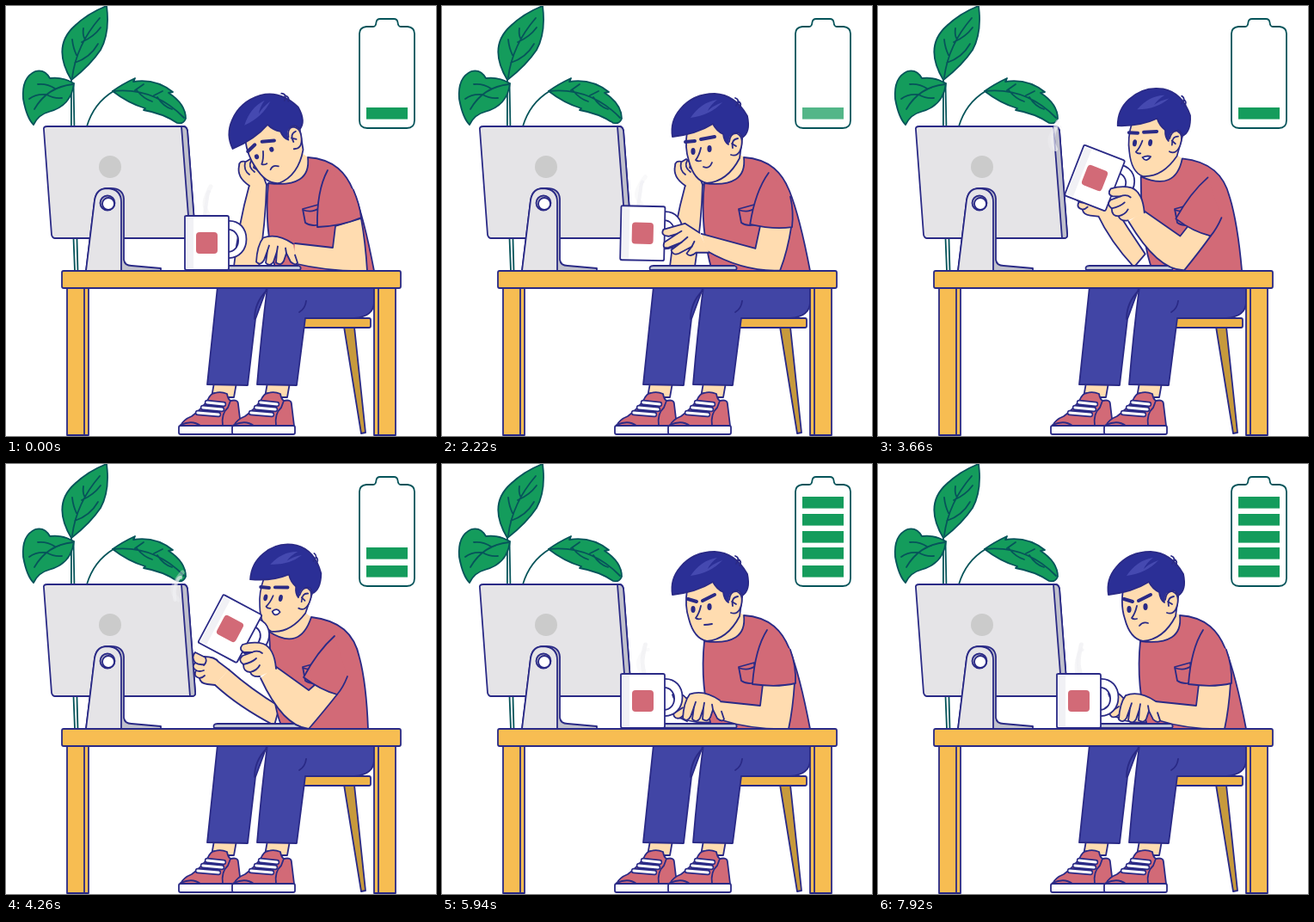
An HTML page that plays this animation: 500x500 px, repeating every 8 s.

```html
<!DOCTYPE html>
<html lang="en">
<head>
<meta charset="utf-8">
<title>Desk worker</title>
<style>
html, body { margin: 0; width: 100%; height: 100%; overflow: hidden; background: #fff; }
svg { display: block; width: 100vw; height: 100vh; }
.o { stroke: #2a2a86; stroke-width: 1.8; stroke-linejoin: round; stroke-linecap: round; fill: none; }
.skin { fill: #ffdcb0; }
.shirt { fill: #d26a77; }
.pants { fill: #4145a5; }
.wood { fill: #f7bd52; }
.white { fill: #fff; }
.screen { fill: #e5e4e7; }
.edge { fill: #c0c0cc; }
.plant { fill: #149c5c; stroke: #06545a; stroke-width: 1.8; stroke-linejoin: round; stroke-linecap: round; }
.vein { fill: none; stroke: #06545a; stroke-width: 1.8; stroke-linecap: round; }
</style>
</head>
<body>
<svg viewBox="0 0 500 500">
  <defs>
    <g id="shoe">
      <path class="o skin" d="M242 438L239 455H265L268 438Z"/>
      <path class="o shirt" d="M203 488Q206 481 216 477Q227 469 234 459Q238 450 243 450Q250 448 257 451Q258 457 261 459Q270 457 270 463L273 488Z"/>
      <path class="o" d="M203 487Q217 481 226 488M252 488Q250 474 258 467L261 459"/>
      <path class="o" style="stroke-width:6.4" d="M234 461l19 2M229 467l22 2M223 473l24 2"/>
      <path class="o" style="stroke:#fff;stroke-width:3.2" d="M234 461l19 2M229 467l22 2M223 473l24 2"/>
      <rect class="o white" x="201" y="488" width="73" height="10" rx="2"/>
    </g>
  </defs>

  <g id="plants">
    <path class="vein" d="M76 84Q75 200 80 308M78.500 90Q80 200 83.500 308M94 140Q102 113 125 99"/>
    <path class="plant" d="M76 86C61 61 61 40 80 23Q96 8 117 0Q121 31 110 51Q98 69 76 86Z"/>
    <path class="vein" d="M77 83Q82 45 109 14M82 57Q78 49 77 39M80 66Q98 60 107 44M91 37Q89 33 90 26M88 42Q102 36 110 25"/>
    <path class="plant" d="M79 90Q66 82 51 84Q45 73 34 76Q18 83 20 108Q24 130 32 138Q38 126 50 123Q76 116 79 90Z"/>
    <path class="vein" d="M78 91Q48 94 33 120M57 96Q48 90 37 91M46 103Q35 102 27 108M47 103Q56 108 65 107"/>
    <path class="plant" d="M124 99Q135 91 150 84L148 88Q174 84 194 100L189 101Q209 114 209 131Q206 138 199 136Q183 125 160 121L162 119Q142 113 124 99Z"/>
    <path class="vein" d="M124 99Q172 94 207 130M150 98L160 91M172 104L182 99M152 98Q160 108 170 111M176 106Q183 117 193 120"/>
  </g>

  <path class="o screen" d="M48 140H206Q210 140 211 145L220 265Q221 270 216 270H57Q54 270 53 266L44 144Q43 140 48 140Z"/>
  <path class="o edge" d="M204 140H206Q210 140 211 145L220 265Q221 270 216 270H214Z"/>
  <circle cx="121" cy="187" r="13" fill="#cbcbcb"/>
  <path class="o edge" d="M93 308L103 226Q105 212 119 212Q136 211 137 224V295Q138 302 146 302L180 305V308Z"/>
  <path class="o screen" d="M93 308L103 226Q105 212 118 212Q134 213 134 228V308Z"/>
  <circle class="o edge" cx="118" cy="229" r="8.500"/>
  <circle class="o white" cx="119" cy="230" r="7"/>

  <path class="o" style="fill:#c79a3c" d="M393 373L405 373L418 496L413 497Z"/>
  <rect class="o" style="fill:#eeb349" x="335" y="363" width="89" height="11" rx="2"/>
  <use id="shoeL" href="#shoe"/>
  <path id="legL" class="o pants"/>
  <use href="#shoe" x="62"/>
  <path class="o pants" d="M304 326Q297 380 292 440L338 441L348 363Q380 363 405 363Q428 361 428 344V326Z"/>
  <path class="o" d="M289 364Q289 345 303 331M349 343Q348 352 341 356"/>

  <path id="far" class="o skin"/>
  <g id="farHands">
    <g data-hand="fist" data-at="293 207.500">
      <path class="o skin" d="M283 209Q268 199 271 186Q271 179 279 181L284 178Q290 181 288 188Q296 192 300 200L303 208"/>
      <path class="o" d="M278 182Q276 191 283 196M285 180Q281 187 289 193"/>
    </g>
    <g data-hand="pinch" data-at="293 207.500">
      <path class="o skin" d="M283 209Q267 200 268 186Q269 179 278 180L284 182L290 175Q296 177 293 191Q297 194 300 200L303 208"/>
      <path class="o" d="M274 182Q274 191 282 192Q289 189 284 183M290 177Q286 186 292 192"/>
    </g>
    <g data-hand="open" data-at="251 248">
      <path class="o skin" d="M243 257L234 256Q226 255 225 249Q217 247 221 240Q215 236 220 231Q215 224 220 219L230 224Q243 224 247 230L259 239"/>
      <path class="o" d="M220 231Q224 234 231 233M221 240Q225 242 230 240M225 249Q228 249 231 246M231 224Q235 229 230 234"/>
    </g>
    <g data-hand="rest" data-at="285 285">
      <path class="o skin" d="M285 272Q275 261 268 267Q270 274 275 276L264 284Q261 291 269 289Q270 296 277 294L285 298"/>
      <path class="o" d="M269 289L280 282M277 294L286 287"/>
    </g>
  </g>

  <path id="neck" class="skin"/>
  <path id="torso" class="o shirt"/>
  <path id="pocket" class="o" d="M345 236L363 231L366 254Q355 257 348 252ZM345 237Q356 241 364 235"/>

  <g id="head">
    <path class="o skin" d="M285 146Q282 165 287 180Q293 203 308 206Q332 204 346 177L350 148L318 132Z"/>
    <path d="M268 152Q265 134 277 120Q292 102 317 102Q341 103 355 128Q359 147 349 153Q345 143 337 150L333 161Q328 158 327 149Q319 145 315 137Q296 149 268 152Z" class="o" style="fill:#2b2f96"/>
    <path d="M289 130Q301 112 320 109Q312 115 309 122Q315 116 326 112Q312 127 289 130Z" fill="#4549b0"/>
    <path class="o" d="M341 107Q347 109 342 116M346 118Q349 114 345 111"/>
    <path class="skin" d="M334 162Q332 149 341 148Q351 150 349 162Q346 174 337 173Z"/>
    <path class="o" d="M334 158Q335 148 342 148Q351 151 348 164Q345 176 336 173M344 154Q336 155 338 165M337 160L342 163"/>
    <path class="o" d="M301 165Q299 174 295 179Q297 181 301 180"/>
    <path id="brows" class="o" style="stroke-width:4"/>
    <path id="mouth" class="o white"/>
    <g fill="#2a2a86">
      <ellipse class="eye" cx="292" cy="169" rx="2.600"/>
      <ellipse class="eye" cx="311" cy="166" rx="2.600"/>
    </g>
  </g>

  <path class="o" style="fill:#c3c7d6" d="M242 307Q240 302 246 302H340Q344 303 342 307Z"/>
  <g id="steam" fill="none" stroke="#f1f1f4" stroke-linecap="round"><path/><path/></g>
  <g id="mug">
    <path class="o white" fill-rule="evenodd" d="M257 250C287 247 287 295 257 293V286C274 287 275 259 257 260Z"/>
    <path class="o white" d="M208 245Q208 244 210 244H257Q259 244 259 246V305Q259 307 257 307H210Q208 307 208 305Z"/>
    <path d="M210 246h8v59h-8z" fill="#f1f1f5"/>
    <rect x="221" y="263" width="25" height="25" rx="4" fill="#d26a77"/>
  </g>
  <path id="near" class="o skin"/>
  <path id="sleeve" class="o shirt"/>
  <g id="nearHands">
    <g data-hand="type" data-at="324 287">
      <path class="o skin" d="M323 276Q304 263 288 269Q281 278 280 297Q285 302 289 295L293 284L291 298Q296 303 300 297L304 285L303 298Q309 302 312 296L315 287L320 297Q326 302 328 298L325 289"/>
      <path class="o" d="M293 284L295 278M304 285L305 279M315 287L314 281"/>
    </g>
    <g data-hand="reach" data-at="308 281">
      <path class="o skin" d="M303 270L286 259Q275 262 261 266Q257 273 267 274L277 271L262 281Q259 289 267 287L282 281L270 290Q272 297 279 294L294 286L288 294Q292 299 299 293L314 293"/>
      <path class="o" d="M277 271L282 268M282 281L289 275M294 286L297 280"/>
    </g>
    <g data-hand="grip" data-at="290.500 250">
      <path class="o skin" d="M300 246Q298 222 285 217Q274 214 261 218Q256 224 263 227L272 227L261 231Q255 236 262 241Q262 250 270 250Q272 256 281 255"/>
      <path class="o" d="M272 227Q279 224 284 228M262 241Q272 239 277 234M270 250Q278 248 281 242"/>
    </g>
  </g>

  <path class="o wood" d="M71 328H96V499H71ZM91 328V499M428 328H453V499H428ZM433 328V499"/>
  <rect class="o wood" x="65" y="308" width="394" height="20" rx="2"/>

  <path class="vein" d="M419 24H427Q430 24 430.500 19Q431 15 435 15H451Q455 15 455.500 19Q456 24 459 24H467Q475 25 475 32V133Q475 142 466 142H420Q411 142 411 133V32Q411 25 419 24Z"/>
  <g id="bars" fill="#149c5c"></g>
</svg>
<script>
const LOOP = 8000;
const $ = id => document.getElementById(id);
const clamp = v => Math.max(0, Math.min(1, v));
const ease = k => k * k * (3 - 2 * k);
const nums = s => s.match(/-?[\d.]+/g).map(Number);

// Blend two strings that share the same structure.
function mix(a, b, k) {
  const to = nums(b);
  let i = 0;
  return a.replace(/-?[\d.]+/g, n => (+n + (to[i++] - n) * k).toFixed(2));
}

const headAt = (x, y, r, w = 1) =>
  `translate(${x + 342} ${y + 161}) rotate(${r}) scale(${w} 1) translate(-342 -161)`;
const mugAt = (x, y, r) => `translate(${x} ${y}) rotate(${r} 233.5 275.5)`;

const work = {
  torso: 'M351 176C382 178 396 195 404 215Q416 245 428 308L314 308C306 280 301 245 305 206Q355 212 351 176Z',
  sleeve: 'M378 193Q364 215 361 256Q390 260 411 255Q412 235 405 216',
  near: 'M322 276L370 281L373 256L410 254Q408 285 403 308Q360 309 326 298',
  far: 'M285 272Q300 275 316 277L316 300Q300 302 285 298',
  pocket: 'translate(0 0)',
  head: headAt(0, 0, 0),
  mug: mugAt(0, 0, 0),
  legL: 'M246 326L234 440L281 441L290 364L304 326',
  shoeL: 'translate(0 0)',
  brows: 'M286 157L296 160M303 159L317 152',
  mouth: 'M305 187Q309 187 314 186Q309 187 305 187Z',
  eye: '4', farHand: 'rest', nearHand: 'type'
};
const propped = 'M283 208Q270 255 265 303L294 303Q302 250 303 207';
const slump = { ...work,
  sleeve: 'M374 191Q361 215 362 257Q390 256 413 246Q411 230 404 214',
  near: 'M336 276L380 281L383 256L413 247Q418 275 420 308Q375 309 334 299',
  far: propped, farHand: 'fist',
  head: headAt(-5, -8, -17),
  brows: 'M284 160L294 155M303 154L317 157',
  mouth: 'M303 188Q307 183 313 187Q307 183 303 188Z', eye: '3'
};
const upright = { ...slump,
  torso: 'M362 178C394 181 408 196 413 222Q421 250 424 308L312 308C298 285 297 220 315 196Q352 216 362 178Z',
  sleeve: 'M385 193Q373 210 371 256Q395 258 416 249Q416 235 412 218',
  near: 'M328 279L382 280L383 256L414 250Q414 280 411 308Q365 308 330 297',
  farHand: 'pinch', pocket: 'translate(8 1)',
  head: headAt(19, -5, 6, 0.98),
  legL: 'M249 326L225 438L271 440L286 364L304 326',
  shoeL: 'translate(-3 0)',
  mouth: 'M304 184Q308 183 312 183Q309 191 304 184Z', eye: '3.5'
};
const back = { ...work,
  near: 'M302 270L368 283L372 256L410 254Q407 285 400 308Q355 308 314 292',
  mouth: 'M304 187Q311 190 314 182Q311 190 304 187Z', nearHand: 'reach'
};
const grab = { ...back, far: propped, farHand: 'fist', brows: 'M283 158L294 157M301 155L317 152' };
const hold = { ...grab,
  sleeve: 'M387 198Q366 215 347 246Q366 261 391 266Q398 257 405 244',
  near: 'M300 245L350 278L362 255L391 266Q382 283 366 305Q335 316 281 255',
  mug: mugAt(-1, -56, 6), nearHand: 'grip'
};
const drink = { ...hold,
  torso: 'M355 178C388 182 405 197 411 225Q419 255 421 308L322 308C310 285 308 240 306 195Q342 218 355 178Z',
  sleeve: 'M382 200Q362 218 346 248Q366 263 385 268Q392 260 397 247',
  near: 'M313 235L352 263L360 256L385 268Q370 287 352 308Q322 305 296 249',
  far: 'M243 257Q270 282 312 304L318 282Q285 262 259 239',
  farHand: 'open', head: headAt(6, -4, 12, 0.91), mug: mugAt(27, -84, 28),
  mouth: 'M304 183Q309 177 314 182Q309 190 304 183Z'
};
const frown = { ...work, mouth: 'M304 188Q308 183 314 185Q308 183 304 188Z' };

const keys = [
  [0, slump], [800, slump], [1040, upright], [1680, upright], [1980, grab], [2100, grab],
  [2520, hold], [3420, hold], [3800, drink], [4320, drink], [4760, back], [5300, back],
  [5440, work], [7400, work], [7560, frown], [LOOP, frown]
];
const barTimes = [-1000, 3900, 4480, 4840, 5460];
const bars = barTimes.map((_, i) => {
  const r = document.createElementNS('http://www.w3.org/2000/svg', 'rect');
  const box = { x: 419, y: [118, 97, 78, 58, 38][i], width: 48, height: 13.6 };
  for (const name in box) r.setAttribute(name, box[name]);
  return $('bars').appendChild(r);
});

// Put a hand on the wrist, midway between the first and last arm points.
function placeHand(group, hand, arm, dy) {
  const p = nums(arm), [ex, ey] = p.slice(-2);
  const x = (p[0] + ex) / 2, y = (p[1] + ey) / 2 + dy;
  for (const g of $(group).children) {
    const [ax, ay] = nums(g.dataset.at);
    g.style.display = g.dataset.hand === hand ? '' : 'none';
    g.setAttribute('transform', `translate(${x - ax} ${y - ay})`);
  }
}

function drawSteam(t, mug) {
  const [x, y, r] = nums(mug);
  $('steam').setAttribute('transform', `translate(${x - r * 2.2} ${y})`);
  [...$('steam').children].forEach((p, i) => {
    const a = t / 400 + i * 2;
    const s = 4 * Math.sin(a);
    p.setAttribute('d', `M${235 - i * 4} 242Q${229 + s} 233 ${232 + s / 2} 224T${238 - s / 2} ${210 + i * 6}`);
    p.setAttribute('stroke-width', 5 - i);
    p.setAttribute('opacity', 0.6 + 0.25 * Math.sin(a));
  });
}

function render(t) {
  let i = 0;
  while (i < keys.length - 2 && t >= keys[i + 1][0]) i++;
  const [t0, a] = keys[i], [t1, b] = keys[i + 1];
  const k = ease(clamp((t - t0) / (t1 - t0)));
  const at = name => mix(a[name], b[name], k);
  const pose = k < 0.5 ? a : b;

  for (const id of ['torso', 'sleeve', 'near', 'far', 'legL', 'brows', 'mouth']) $(id).setAttribute('d', at(id));
  for (const id of ['head', 'mug', 'pocket', 'shoeL']) $(id).setAttribute('transform', at(id));
  document.querySelectorAll('.eye').forEach(e => e.setAttribute('ry', at('eye')));

  const n = nums(at('torso')).slice(18);
  $('neck').setAttribute('d', `M${n[0]} ${n[1]}Q${n[2]} ${n[3]} ${n[4]} ${n[5]}l-22 -16Z`);

  const tap = 1.3 * Math.sin(t / 60);
  placeHand('nearHands', pose.nearHand, at('near'), pose.nearHand === 'type' ? tap : 0);
  placeHand('farHands', pose.farHand, at('far'), pose.farHand === 'rest' ? -tap : 0);

  drawSteam(t, at('mug'));
  bars.forEach((r, j) => r.setAttribute('opacity', clamp((t - barTimes[j]) / 120)));
  if (t < 3120) bars[0].setAttribute('opacity', Math.abs(1 - 2 * (t / 1040 % 1)));
}

const start = performance.now();
function tick() {
  render((performance.now() - start) % LOOP);
  requestAnimationFrame(tick);
}
tick();
</script>
</body>
</html>
```
